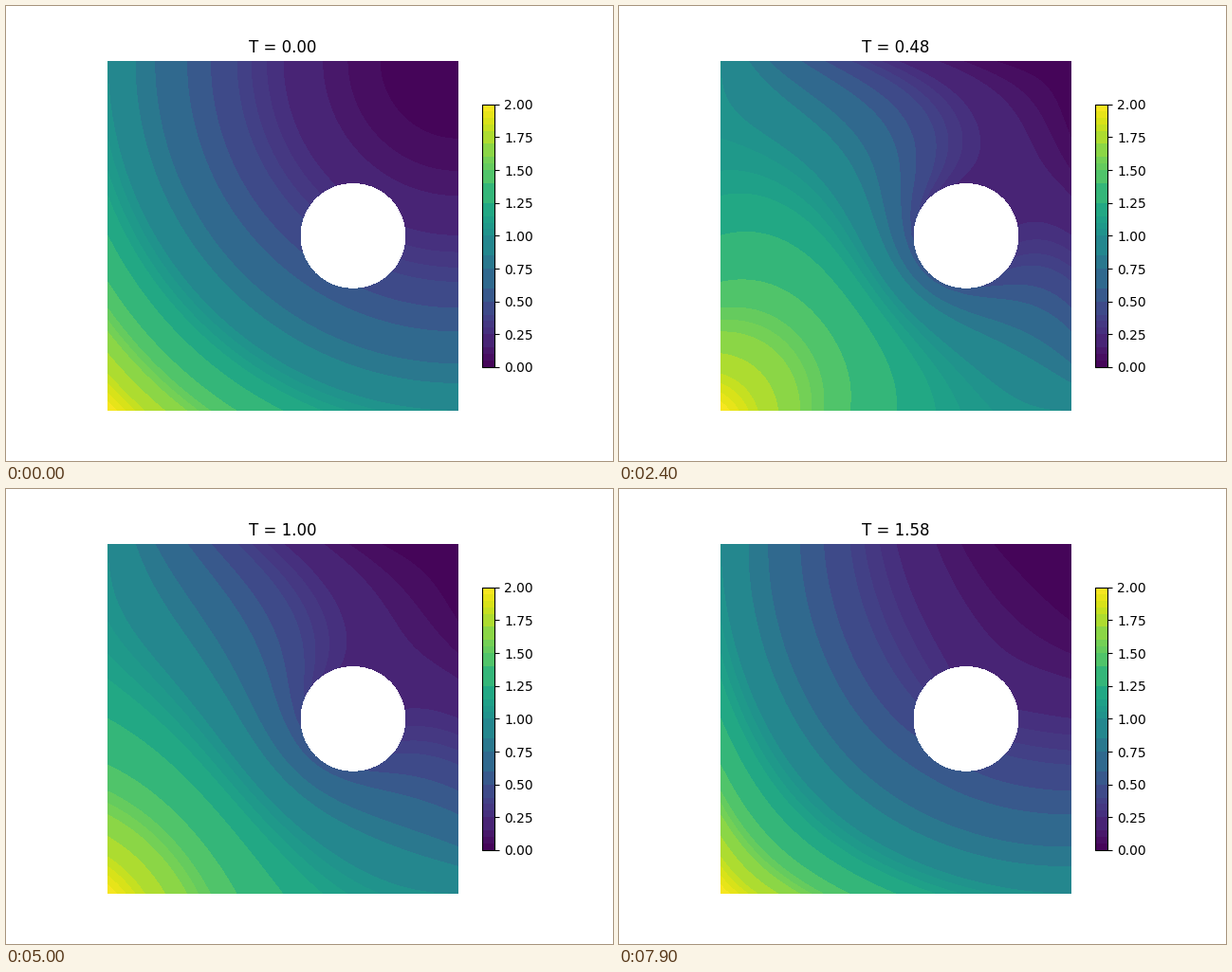
Animation of 640x480 px, one loop 8000 ms. Source, as a matplotlib script:

```python
import numpy as np
import matplotlib.pyplot as plt
from matplotlib.animation import FuncAnimation
from matplotlib.cm import ScalarMappable
from matplotlib.colors import BoundaryNorm, ListedColormap
from matplotlib.patches import Circle

W, H = 640, 480
FRAMES, INTERVAL = 80, 100
DT_FRAME, SUBSTEPS = 0.02, 300
N = 101
DIFFUSION, WIND, OMEGA = 0.3, 1.0, 1.5
HOLE, RADIUS = (0.7, 0.5), 0.15

axis = np.linspace(0, 1, N)
X, Y = np.meshgrid(axis, axis)
G = (1 - X) ** 2 + (1 - Y) ** 2


def solve():
    """Advection-diffusion with an oscillating diagonal wind; u = G on every edge."""
    h, dt = 1 / (N - 1), DT_FRAME / SUBSTEPS
    k = DIFFUSION * dt / h**2
    inside = (X - HOLE[0]) ** 2 + (Y - HOLE[1]) ** 2 <= RADIUS**2 + 1e-9
    hole = np.flatnonzero(inside)
    fixed = G.ravel()[hole]
    u = G.copy()
    flat = u.ravel()
    states = [u.copy()]
    for step in range((FRAMES - 1) * SUBSTEPS):
        a = WIND * np.cos(OMEGA * step * dt) * dt / (2 * h)
        ahead = u[1:-1, 2:] + u[2:, 1:-1]
        behind = u[1:-1, :-2] + u[:-2, 1:-1]
        u[1:-1, 1:-1] = (1 - 4 * k) * u[1:-1, 1:-1] + (k - a) * ahead + (k + a) * behind
        flat[hole] = fixed
        if (step + 1) % SUBSTEPS == 0:
            states.append(np.clip(u, 0, 2))
    return states


states = solve()

# Bands in steps of 0.05, with neighbours of near-equal colour joined.
joined = {4, 9, 11, 13, 14, 16, 18, 19, 24, 26, 27, 29, 33, 35}
levels = np.array([i / 20 for i in range(41) if i not in joined])
colors = plt.get_cmap("viridis")((levels[:-1] + levels[1:]) / 4)

fig = plt.figure(figsize=(W / 100, H / 100), dpi=100, facecolor="white")
ax = fig.add_axes([107.2 / W, 0.11, 369.6 / W, 0.77])
ax.set(xlim=(0, 1), ylim=(0, 1))
ax.axis("off")
title = ax.set_title("T = 0.00")
ax.add_patch(Circle(HOLE, 0.1485, fc="white", ec="none", antialiased=False, zorder=3))

cax = fig.add_axes([501.6 / W, 99 / H, 13.86 / W, 277.2 / H])
bands = ScalarMappable(BoundaryNorm(levels, len(colors)), ListedColormap(colors))
bar = fig.colorbar(bands, cax=cax, spacing="proportional",
                   ticks=np.arange(0, 2.01, 0.25), format="%.2f")
bar.ax.minorticks_off()

drawn = []


def update(i):
    while drawn:
        drawn.pop().remove()
    drawn.append(ax.contourf(X, Y, states[i], levels=levels, colors=colors))
    title.set_text(f"T = {i * DT_FRAME:.2f}")
    return drawn + [title]


anim = FuncAnimation(fig, update, frames=FRAMES, interval=INTERVAL,
                     init_func=lambda: update(0), repeat=True, repeat_delay=0, blit=False)
plt.show()
```
